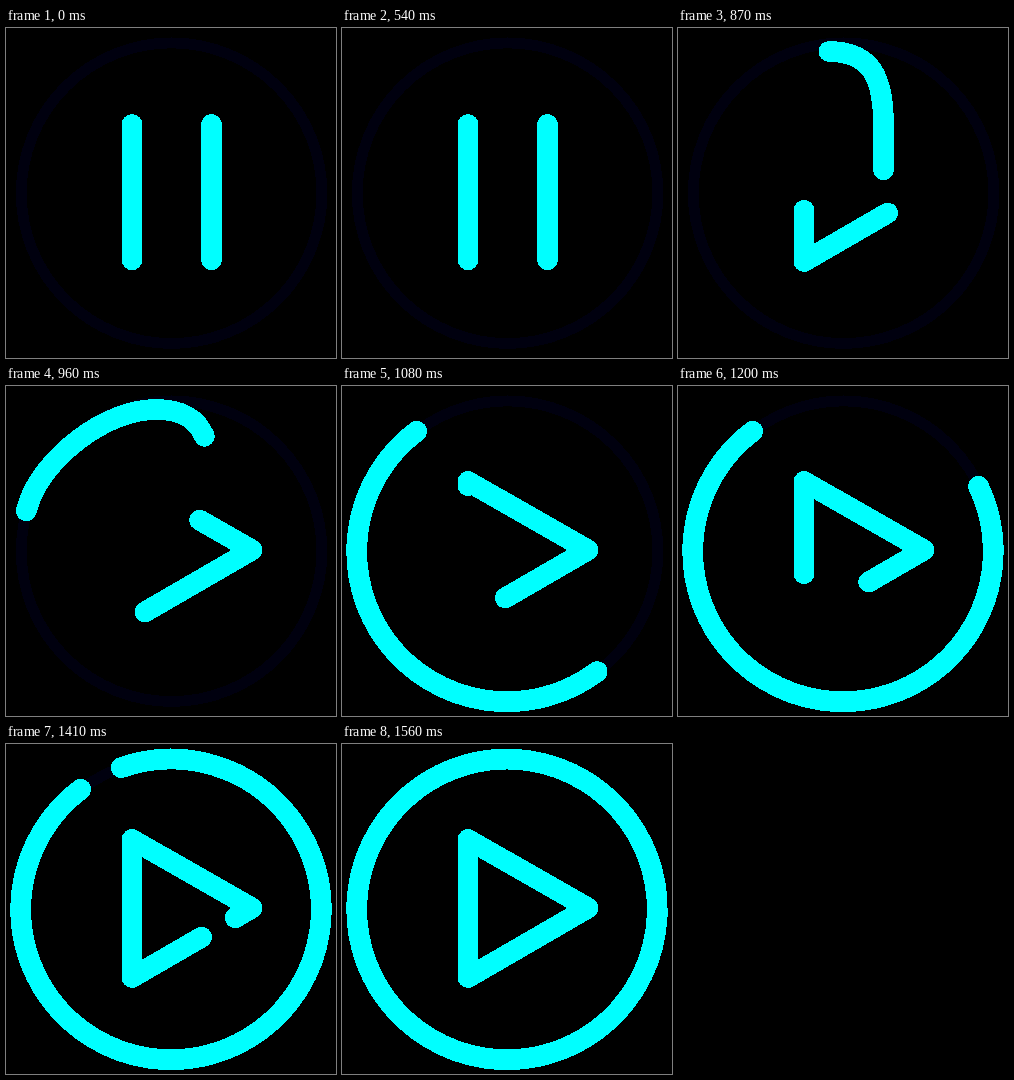
Animation of 330 by 330 pixels, one loop 2.49 s. Source, as an HTML page:

```html
<!DOCTYPE html>
<html lang="en">
<head>
<meta charset="utf-8">
<title>Pause to play</title>
<style>
  html, body { margin: 0; width: 100%; height: 100%; overflow: hidden; background: #000; }
  svg { display: block; width: 100vw; height: 100vh; shape-rendering: crispEdges; }
  path { fill: none; stroke: #0ff; stroke-width: 20.8; stroke-linecap: round; stroke-linejoin: round; }
</style>
</head>
<body>
<svg viewBox="0 0 330 330">
  <circle cx="165.6" cy="165.2" r="150.3" fill="none" stroke="#00000f" stroke-width="10.8"/>
  <!-- right bar, bending into the ring -->
  <path id="swoop" d="M205.5 232V97C205.5 50 194 23.5 150 23.5C98 23.5 39 72.6 23.8 113.9A150.3 150.3 0 0 0 255.2 285.5"/>
  <path id="ring" pathLength="360" transform="translate(165 165.4) rotate(233.1)" d="M150.3 0A150.3 150.3 0 0 0 -150.3 0A150.3 150.3 0 0 0 150.3 0"/>
  <!-- triangle outline, twice around -->
  <path id="tri" d="M126 95.5V233.5L246 164L126 95.5V233.5L246 164L126 95.5"/>
</svg>
<script>
const LOOP = 2490, STEP = 30, START = 540, SWITCH = 1080, END = 1560;
const $ = id => document.getElementById(id);
const swoop = $('swoop'), ring = $('ring'), tri = $('tri');

// Smooth monotone curve through [time, value] keys, starting at rest.
function curve(keys, endSlope) {
  const n = keys.length - 1;
  const d = keys.slice(1).map((k, i) => (k[1] - keys[i][1]) / (k[0] - keys[i][0]));
  const m = keys.map((_, i) => {
    if (i === 0) return 0;
    if (i === n) return endSlope;
    const a = d[i - 1], b = d[i];
    return a * b > 0 ? 2 * a * b / (a + b) : 0;
  });
  return t => {
    if (t <= keys[0][0]) return keys[0][1];
    if (t >= keys[n][0]) return keys[n][1];
    let i = 0;
    while (t > keys[i + 1][0]) i++;
    const [t0, a] = keys[i], [t1, b] = keys[i + 1];
    const h = t1 - t0, x = (t - t0) / h, y = 1 - x;
    return a * y * y * (1 + 2 * x) + b * x * x * (1 + 2 * y)
      + h * x * y * (m[i] * y - m[i + 1] * x);
  };
}

const triTail = curve([[START, 1], [750, 7.5], [960, 153], [SWITCH, 181], [1320, 241], [END, 276.7]], 0.08);
const triHead = curve([[START, 136.3], [750, 136.5], [960, 337], [SWITCH, 419], [1320, 586], [END, 692.2]], 0.25);
const swoopTail = curve([[START, 0.3], [750, 12.5], [960, 182.5], [SWITCH, 318]], 1.2);
const swoopHead = t => 135.5 + 646 * Math.max(0, (t - 728) / 352) ** 2;

function sweep(t) {
  const x = Math.min(1, Math.max(0, (t - SWITCH) / (END - SWITCH)));
  return 360 - 180 * (1 - x) ** 2;
}

function trim(el, from, to) {
  el.style.strokeDasharray = `${to - from} 3000`;
  el.style.strokeDashoffset = -from;
}

function draw(time) {
  const t = Math.floor(time % LOOP / STEP) * STEP;
  const round = t >= SWITCH;
  swoop.style.display = round ? 'none' : '';
  ring.style.display = round ? '' : 'none';
  if (round) trim(ring, 0, sweep(t));
  else trim(swoop, swoopTail(t), swoopHead(t));
  trim(tri, triTail(t), triHead(t));
}

let origin;
function tick(now) {
  origin ??= now;
  draw(Math.max(0, now - origin));
  requestAnimationFrame(tick);
}
draw(0);
requestAnimationFrame(tick);
</script>
</body>
</html>
```
